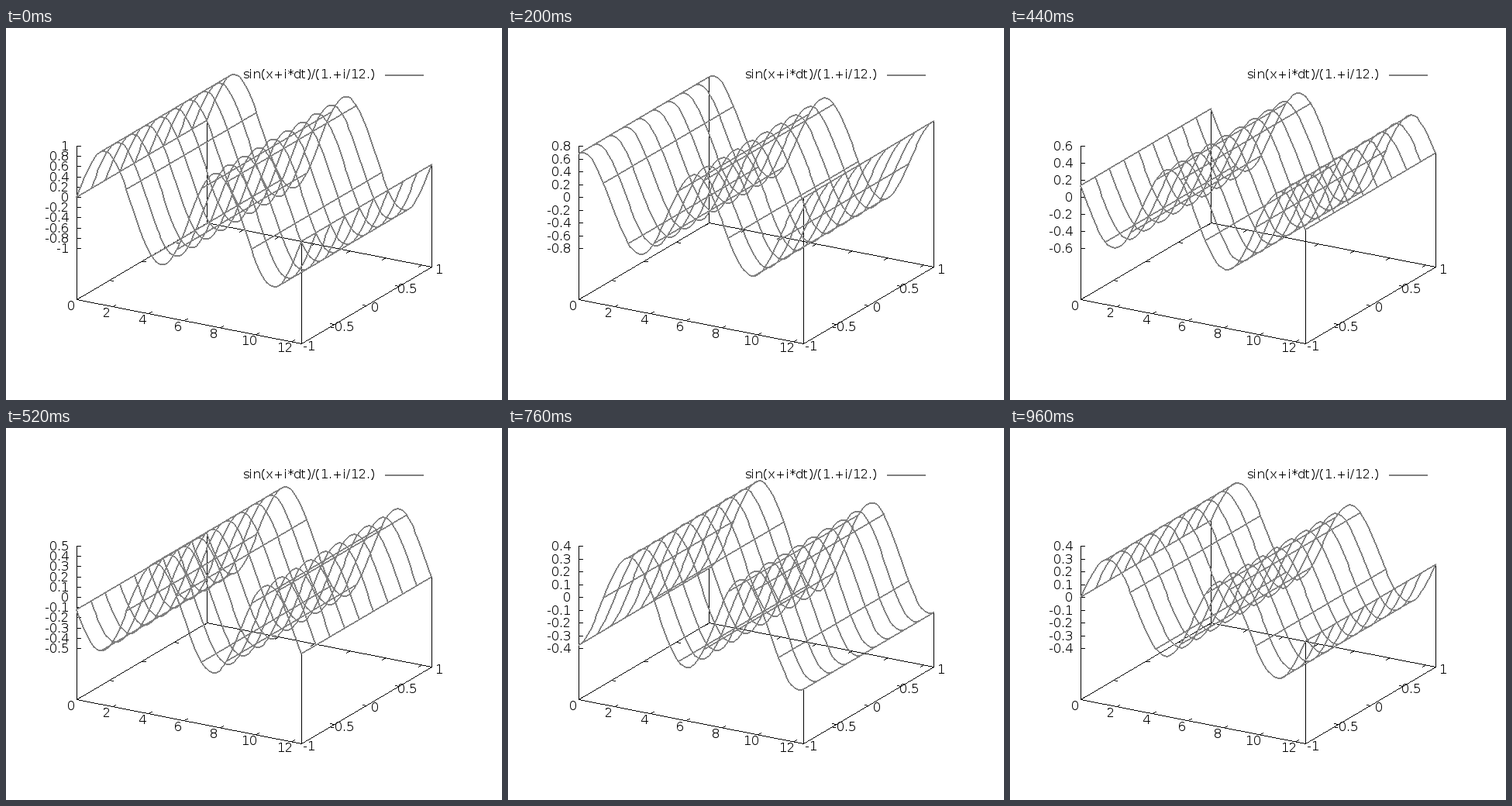
Animation of 640x480 px, one loop 1000 ms. Source, as a matplotlib script:

```python
import numpy as np
import matplotlib.pyplot as plt
from matplotlib.animation import FuncAnimation
from matplotlib.textpath import TextPath

FRAMES, INTERVAL = 25, 40
WIDTH, HEIGHT = 640, 480
X_MAX = 4 * np.pi
DT = 2 * np.pi / 24
PX = 0.9  # points per pixel at 80 dpi
BLACK, GREY = 0, 128

# Oblique projection: box corner and edge vectors in pixels
ORIGIN = np.array([91, 350])
X_EDGE = np.array([290, 57])
Y_EDGE = np.array([168, -99])
Z_ZERO, Z_HALF = 132, 66
TIC = 5

# Fully hinted glyphs give crisp one-pixel stems
plt.rcParams.update({"font.family": "DejaVu Sans",
                     "text.hinting": "native", "text.hinting_factor": 1})
fig = plt.figure(figsize=(8, 6), dpi=80, facecolor="white")
ax = fig.add_axes([0, 0, 1, 1])
canvas = ax.imshow(np.full((HEIGHT, WIDTH), 255, np.uint8), cmap="gray",
                   vmin=0, vmax=255, extent=(0, WIDTH, HEIGHT, 0),
                   aspect="auto", interpolation="nearest")
ax.set_xlim(0, WIDTH)
ax.set_ylim(HEIGHT, 0)
ax.axis("off")


def to_pixel(p):
    return np.floor(np.asarray(p) + 0.5).astype(int)


def draw_line(image, start, end, shade, width=1):
    """Draw a line without smoothing, widened across its minor axis."""
    a, b = to_pixel(start), to_pixel(end)
    delta = b - a
    steps = max(1, np.abs(delta).max())
    t = np.arange(steps + 1)[:, None] / steps
    x, y = to_pixel(a + delta * t).T
    steep = abs(delta[1]) > abs(delta[0])
    for k in range(width):
        if steep:
            image[y, x - k] = shade
        else:
            image[y - k, x] = shade


def draw_path(image, points, shade, width=1):
    for a, b in zip(points[:-1], points[1:]):
        draw_line(image, a, b, shade, width)


def base(x, y):
    """Pixel position on the floor for x in 0..X_MAX and y in -1..1."""
    u = np.asarray(x)[..., None] / X_MAX
    v = (np.asarray(y)[..., None] + 1) / 2
    return ORIGIN + u * X_EDGE + v * Y_EDGE


def project(x, y, height):
    """Pixel position of a point raised by a height given in half ranges."""
    p = base(x, y)
    p[..., 1] -= Z_ZERO + Z_HALF * height
    return p


def label(x, y, text="", ha="center"):
    return ax.text(x, y, text, ha=ha, va="baseline", fontsize=16 * PX,
                   color="black", zorder=3)


def spaced_label(x, y, text, size):
    """Set hinted glyphs at the unhinted advances of the font."""
    def pen(prefix):
        return TextPath((0, 0), prefix + "|", size=size).get_extents().x1

    for k, char in enumerate(text):
        label(x + pen(text[:k]) - pen(""), y, char, "left")


def unit(edge):
    return edge / np.hypot(*edge)


def make_floor():
    """Floor, its tics and labels, and the legend."""
    image = np.full((HEIGHT, WIDTH), 255, np.uint8)
    outline = [base(x, y) for x, y in
               ((0, -1), (X_MAX, -1), (X_MAX, 1), (0, 1), (0, -1))]
    draw_path(image, outline, BLACK)
    x_tic, y_tic = TIC * unit(Y_EDGE), TIC * unit(X_EDGE)
    for x in range(0, 13, 2):
        front, back = base(x, -1), base(x, 1)
        draw_line(image, front, front + x_tic, BLACK)
        draw_line(image, back, back - x_tic, BLACK)
        label(front[0] - 7.5, front[1] + 13.5, str(x))
    for y in (-1, -0.5, 0, 0.5, 1):
        left, right = base(0, y), base(X_MAX, y)
        draw_line(image, left, left + y_tic, BLACK)
        draw_line(image, right, right - y_tic, BLACK)
        label(right[0] + 10.5, right[1] + 9, f"{y:g}")
    draw_line(image, (489, 61), (538, 61), GREY, 2)
    spaced_label(306, 65, "sin(x+i*dt)/(1.+i/12.)", 16.15)
    return image


floor = make_floor()
z_labels = [label(81, 0, ha="right") for _ in range(11)]

x_fine = np.linspace(0, X_MAX, 100)
x_iso = np.linspace(0, X_MAX, 10)
y_iso = np.linspace(-1, 1, 10)


def update(i):
    image = floor.copy()
    amp = 1 / (1 + i / 12)
    step = 0.2 if amp > 0.501 else 0.1
    count = int(np.ceil(round(amp / step, 6)))

    def wave(x):
        return amp * np.sin(x + i * DT) / (count * step)

    # Corner posts reach the surface; the left one is the z axis
    for x, y in ((X_MAX, -1), (X_MAX, 1), (0, 1)):
        draw_line(image, base(x, y), project(x, y, wave(x)), BLACK)
    draw_line(image, base(0, -1), project(0, -1, 1), BLACK)

    for text in z_labels:
        text.set_text("")
    for text, k in zip(z_labels, range(-count, count + 1)):
        tic = project(0, -1, k / count)
        draw_line(image, tic, tic + (TIC, 0), BLACK)
        text.set_text(f"{round(k * step, 1):g}")
        text.set_y(to_pixel(tic)[1] + 6)

    for y in y_iso:
        draw_path(image, project(x_fine, np.full(100, y), wave(x_fine)),
                  GREY, 2)
    for x in x_iso:
        draw_line(image, project(x, -1, wave(x)), project(x, 1, wave(x)),
                  GREY, 2)
    canvas.set_data(image)
    return [canvas, *z_labels]


anim = FuncAnimation(fig, update, frames=FRAMES, interval=INTERVAL,
                     repeat=True, repeat_delay=0, blit=False)
plt.show()
```
